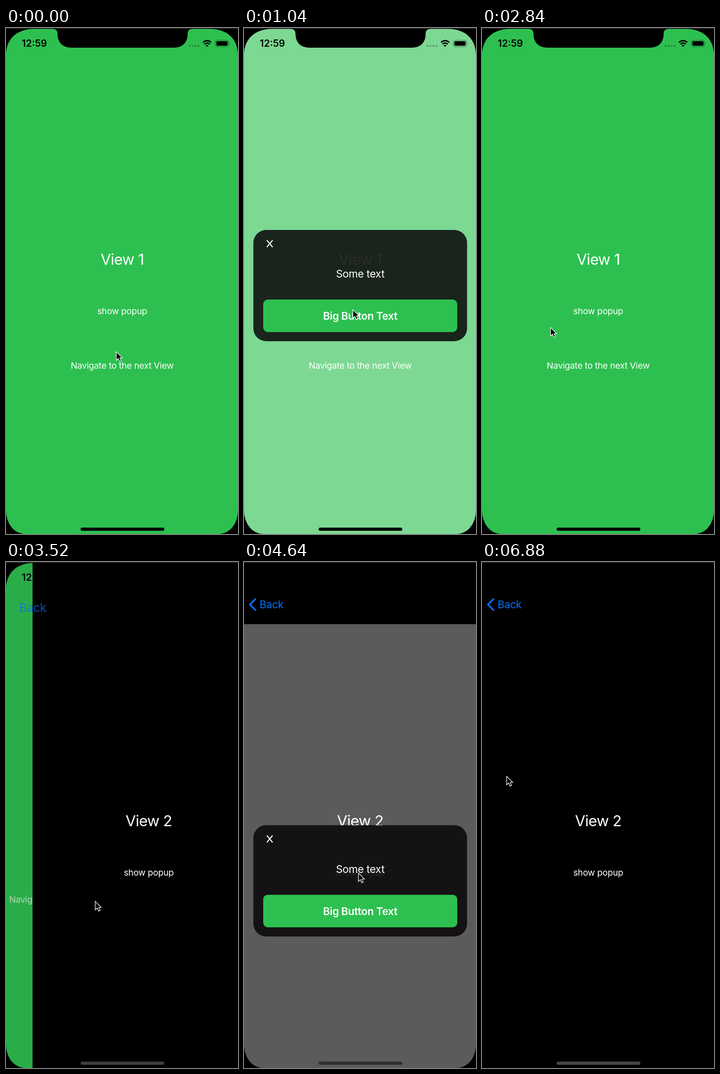
Write an HTML page that moves like this. It is 507 by 1105 pixels and loops after 6960 ms.

```html
<!DOCTYPE html>
<html lang="en">
<head>
<meta charset="utf-8">
<title>Popup and navigation</title>
<style>
  html, body { margin: 0; width: 100%; height: 100%; overflow: hidden; background: #000; }
  svg { display: block; width: 100%; height: 100%; }
  text { font-family: Inter, Roboto, sans-serif; fill: #fff; text-anchor: middle; }
  .title { font-size: 33px; letter-spacing: -.75px; }
  .link { font-size: 19.2px; letter-spacing: -.28px; }
  .label { font-size: 23px; letter-spacing: -.35px; }
  .bold { font-weight: 600; letter-spacing: -.4px; }
  .back { font-size: 23px; letter-spacing: -.35px; fill: #0b6ff5; text-anchor: start; }
  .clock { font-size: 21px; font-weight: 600; fill: #000; text-anchor: start; }
</style>
</head>
<body>
<svg viewBox="0 0 507 1105">
  <rect width="507" height="1105"/>

  <g id="view1">
    <rect width="507" height="1105" fill="#2dc050"/>
    <text class="title" x="254" y="517">View 1</text>
    <text class="link" id="show1" x="254" y="625">show popup</text>
    <text class="link" id="next" x="254" y="744">Navigate to the next View</text>
  </g>
  <rect id="dim" width="507" height="1105"/>

  <g id="view2">
    <rect width="507" height="1105"/>
    <text class="title" x="254" y="577">View 2</text>
    <text class="link" id="show2" x="254" y="685">show popup</text>
  </g>
  <path id="chevron" d="M26 80L13 93L26 106" fill="none" stroke="#0b6ff5" stroke-width="3.6"/>
  <text class="back" id="back">Back</text>

  <g id="popup">
    <rect id="veil" y="2" width="507" height="1105" fill="#fff"/>
    <rect x="20.5" y="441" width="467" height="243" rx="28" fill="#080508" fill-opacity=".85"/>
    <path id="close" d="M50 463.500L62.500 478.500M62.500 463.500L50 478.500" stroke="#fff" stroke-width="2.300"/>
    <text class="label" x="254" y="545">Some text</text>
    <rect x="42" y="593" width="424" height="71" rx="10" fill="#2dc050"/>
    <text class="label bold" x="254" y="637">Big Button Text</text>
  </g>

  <g id="status">
    <text class="clock" x="34.500" y="41">12:59</text>
    <g opacity=".25">
      <circle cx="401" cy="39" r="2.200"/><circle cx="407.500" cy="39" r="2.200"/>
      <circle cx="414" cy="39" r="2.200"/><circle cx="420.500" cy="39" r="2.200"/>
    </g>
    <g fill="none" stroke="#000" stroke-width="3">
      <path d="M430.500 31.500Q439.500 23.500 448.500 31.500M433.800 35.300Q439.500 30.300 445.200 35.300"/>
    </g>
    <path d="M436.300 38Q439.500 35.500 442.700 38L439.500 41.300Z"/>
    <rect x="457.500" y="26.500" width="29" height="14.500" rx="4" fill="none" stroke="#000" stroke-opacity=".42" stroke-width="1.200"/>
    <path d="M488.300 31.500Q490.800 33.700 488.300 36Z" opacity=".45"/>
    <rect x="459.700" y="28.700" width="24.600" height="10.100" rx="2.200"/>
  </g>

  <!-- device frame: rounded corners and notch -->
  <path fill-rule="evenodd" d="M0 0H507V1105H0Z
    M0 60C0 25 22 2 62 2H102C109 2 112.500 6 112.500 12C112.500 32 124 43 144 43H366C386 43 397 32 397 12C397 6 400.500 2 408 2H445C485 2 507 25 507 60V1052C507 1082 490 1105 463 1105H44C17 1105 0 1082 0 1052Z"/>
  <rect width="507" height="2" fill="#242426"/>
  <rect id="home" x="163" y="1091" width="183" height="7" rx="3.500"/>
  <path id="cursor" d="M0 0V18.500L4.300 14.700L7.200 21.300L10.600 19.900L7.800 13.400H13.200Z" stroke="#fff" stroke-width="1.300"/>
</svg>
<script>
const LOOP = 6960, HEIGHT = 1105, WIDTH = 507;
const SLIDE = 350, PUSH = 3273;
const SHOWS = [[616, 2320], [4367, 5990]];   // popup opens, closes

// start, end, x, y, sideways bow
const MOVES = [
  [20, 540, 238, 615, 0],
  [1480, 2120, 51, 464, 13.5],
  [2440, 3080, 195, 741, 0],
  [3660, 4240, 250, 679, 0],
  [4840, 5370, 51, 463, 0],
  [5480, 5780, 54, 468, 0]
];

const el = {};
document.querySelectorAll('[id]').forEach(n => el[n.id] = n);
const set = (id, name, value) => el[id].setAttribute(name, value);
const shift = (id, x, y) => set(id, 'transform', `translate(${x} ${y})`);
const clamp = v => Math.max(0, Math.min(1, v));
const mix = (a, b, k) => a + (b - a) * k;
const ease = (t, start, length) => {
  const k = clamp((t - start) / length);
  return k * k * (3 - 2 * k);
};

// Button label dims while held, then fades back after release.
function pressed(t, release) {
  const down = ease(t, release - 110, 60);
  return 1 - .75 * down * (1 - ease(t, release, 450));
}

function cursorAt(t) {
  let x = 241, y = 707;
  for (const [start, end, tx, ty, bow] of MOVES) {
    const k = ease(t, start, end - start);
    x = mix(x, tx, k) + 4 * k * (1 - k) * bow;
    y = mix(y, ty, k);
  }
  return [x, y];
}

function render(t) {
  const u = (t - PUSH) * .015;
  const rest = u < 0 ? 1 : (1 + u) * Math.exp(-u);   // share of the push still to go
  const second = u >= 0;

  shift('view1', -152 * (1 - rest), 0);
  set('dim', 'opacity', .11 * (1 - rest));
  shift('view2', WIDTH * rest, 0);
  set('back', 'transform', `translate(${34 - 43 * rest} ${101 + 74 * rest}) scale(${1 + 1.13 * rest})`);
  set('back', 'opacity', clamp(1 - 2.2 * rest));
  set('chevron', 'opacity', clamp(1 - 9 * rest));

  const open = SHOWS.reduce((sum, [a, b]) => sum + ease(t, a, SLIDE) - ease(t, b, SLIDE), 0);
  shift('popup', 0, HEIGHT * (1 - open));
  set('veil', 'opacity', second ? .355 : .38);

  set('show1', 'opacity', pressed(t, SHOWS[0][0]));
  set('show2', 'opacity', pressed(t, SHOWS[1][0]));
  set('next', 'opacity', pressed(t, PUSH - 20));
  set('close', 'opacity', Math.min(...SHOWS.map(s => pressed(t, s[1]))));

  const grey = second ? mix(70, 44, open) * (1 - rest) : 8;
  set('home', 'fill', `rgb(${grey} ${grey} ${grey})`);
  shift('cursor', ...cursorAt(t));
}

const begin = performance.now();
function tick() {
  render((performance.now() - begin) % LOOP);
  requestAnimationFrame(tick);
}
tick();
</script>
</body>
</html>
```
